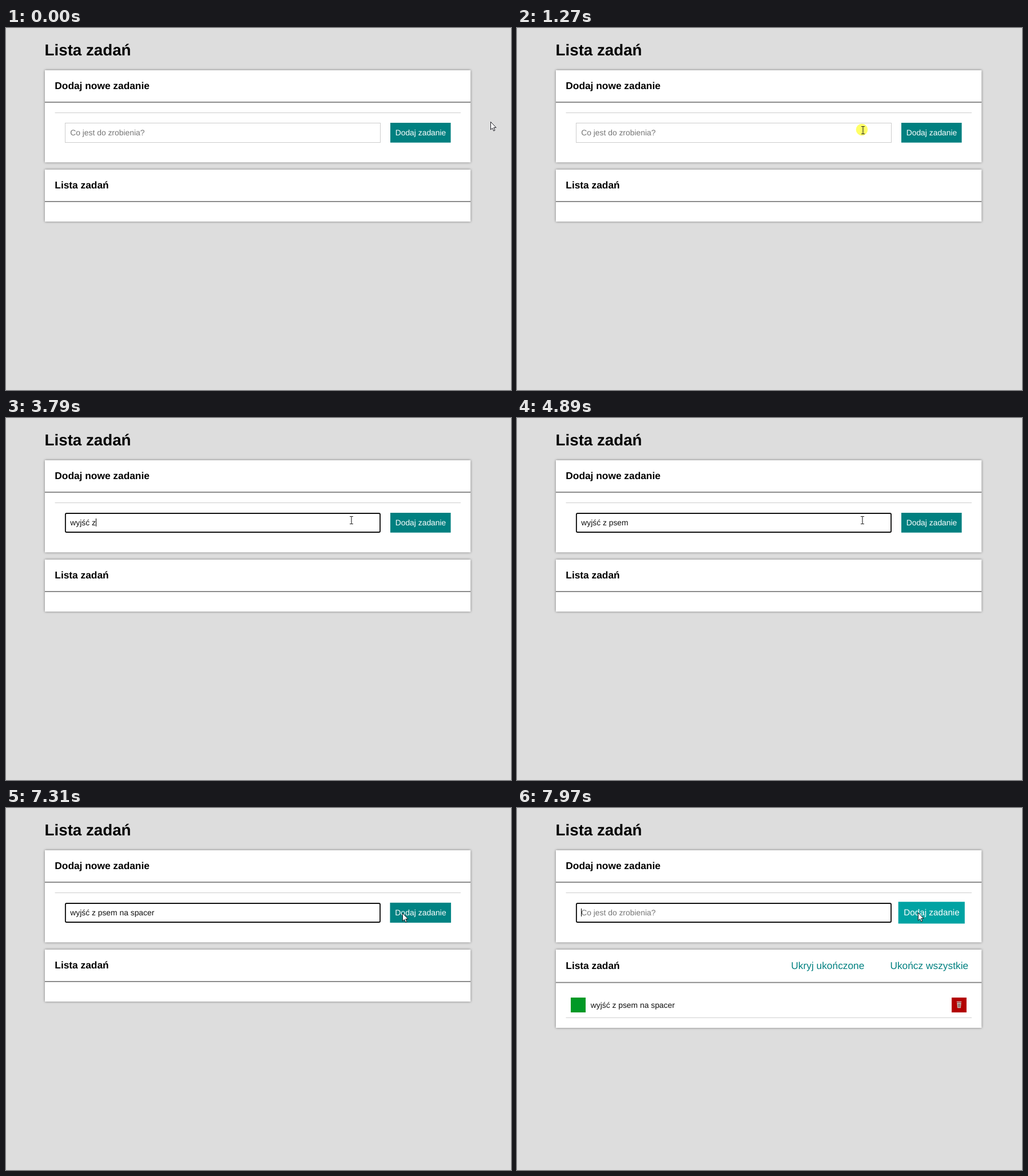
Write an HTML page that moves like this. It is 883x634 px and loops after 7990 ms.

```html
<!DOCTYPE html>
<html lang="pl">
<head>
<meta charset="utf-8">
<title>Lista zadań</title>
<style>
  html, body { margin: 0; width: 100%; height: 100%; overflow: hidden; background: #ddd; }
  svg { display: block; width: 883px; height: 634px; }
  text {
    font: 13.87px "Liberation Sans", Arial, sans-serif;
    text-rendering: geometricPrecision;
    white-space: pre;
  }
  .h1 { font-size: 27.73px; font-weight: bold; }
  .h2 { font-size: 17.33px; font-weight: bold; }
  .link { font-size: 17.33px; fill: teal; }
  .card { fill: #fff; filter: drop-shadow(0 0 2px #0007); }
  .rule { fill: #808080; }
  .thin { fill: #ccc; }
</style>
</head>
<body>
<svg viewBox="0 0 883 634">
  <rect width="883" height="634" fill="#ddd"/>
  <text class="h1" x="67.6" y="48.4">Lista zadań</text>

  <rect class="card" x="68" y="74" width="744.3" height="161.3"/>
  <text class="h2" x="85.3" y="107">Dodaj nowe zadanie</text>
  <rect class="rule" x="68" y="129" width="744.3" height="1.8"/>
  <rect class="thin" x="85.5" y="148" width="709.5" height="1"/>
  <rect id="field" fill="#fff"/>
  <text id="hint" x="112.2" y="188" fill="#757575">Co jest do zrobienia?</text>
  <text id="typed" x="112.2" y="188" fill="#111"></text>
  <rect id="caret" y="176" width="1" height="14"/>
  <g id="button">
    <rect id="face" x="672" y="166" width="105.6" height="34.7"/>
    <text x="725" y="188" fill="#fff" text-anchor="middle">Dodaj zadanie</text>
  </g>

  <rect id="list" class="card" x="68" y="248" width="744.3"/>
  <text id="title" class="h2" x="85.3">Lista zadań</text>
  <rect id="line" class="rule" x="68" width="744.3" height="1.8"/>
  <g id="items">
    <text class="link" x="479.3" y="282">Ukryj ukończone</text>
    <text class="link" x="652.4" y="282">Ukończ wszystkie</text>
    <rect x="94" y="332" width="26" height="26" fill="#009926"/>
    <text x="128.7" y="349.5" fill="#111">wyjść z psem na spacer</text>
    <rect x="760" y="332" width="26" height="26" fill="#b30000"/>
    <path d="M769.3 341h7.4l-.8 9.3h-5.8z" fill="#c9c0b8"/>
    <path d="M769 340.2h8M771.6 342.5v6.5M773 342.5v6.5M774.5 342.5v6.5" stroke="#5c3a35" stroke-width=".7"/>
    <path d="M768.8 339.4h8.4" stroke="#eee" stroke-width="1"/>
    <rect class="thin" x="85.5" y="366.7" width="709.5" height="1"/>
  </g>

  <circle id="spot" r="10.3" fill="#ff0" opacity=".6"/>
  <path id="arrow" d="M.5 .4V14L3.6 11.2 5.7 16.2 7.9 15.2 5.8 10.4H10Z"
        fill="#fff" stroke="#101018" stroke-width=".95"/>
  <path id="beam" d="M-3 -6.5H-.6L0 -6 .6 -6.5H3M0 -6V6M-3 6.5H-.6L0 6 .6 6.5H3"
        fill="none" stroke="#222" stroke-width="1.1"/>
</svg>
<script>
const LOOP = 7990, FOCUS = 1370, HOVER = 7260, ADDED = 7910, BLINK = 518;
const TASK = "wyjść z psem na spacer";
const keys = [2000, 2240, 2520, 3180, 3410, 3520, 3790, 3890, 4040, 4120, 4270,
  4370, 4940, 5390, 5480, 5570, 5790, 5900, 6010, 6130, 6320, 6470];
const clicks = [[1250, 1420], [7790, 7930]];

const linear = u => u;
const easeIn = u => u * u;
const easeOut = u => u * (2 - u);
const smooth = u => u * u * (3 - 2 * u);

// Each stop: time, value, easing of the way there
const pathX = [[20, 847], [550, 762, easeIn], [800, 677, linear], [1230, 605, easeOut],
  [1690, 605], [1691, 604], [6980, 604], [7310, 693, easeIn], [7500, 701, easeOut]];
const pathY = [[800, 163.5], [930, 160, smooth], [1230, 179, smooth],
  [6980, 179], [7310, 184, smooth], [7500, 183, smooth]];

const el = {};
for (const node of document.querySelectorAll("[id]")) el[node.id] = node;

function set(node, attrs) {
  for (const name in attrs) node.setAttribute(name, attrs[name]);
}
function show(node, on) {
  node.style.display = on ? "" : "none";
}
function along(path, t) {
  if (t <= path[0][0]) return path[0][1];
  for (let i = 1; i < path.length; i++) {
    const [t0, a] = path[i - 1], [t1, b, ease = linear] = path[i];
    if (t < t1) return a + (b - a) * ease((t - t0) / (t1 - t0));
  }
  return path[path.length - 1][1];
}

// The CSS "ease" curve
function cssEase(x) {
  if (x <= 0 || x >= 1) return x <= 0 ? 0 : 1;
  const bez = (a, b, s) => 3 * a * s * (1 - s) ** 2 + 3 * b * s * s * (1 - s) + s ** 3;
  let lo = 0, hi = 1;
  for (let i = 0; i < 20; i++) {
    const mid = (lo + hi) / 2;
    if (bez(.25, .25, mid) < x) lo = mid; else hi = mid;
  }
  return bez(.1, 1, lo);
}

function drawField(t) {
  const focused = t >= FOCUS, added = t >= ADDED;
  set(el.field, focused
    ? { x: 103.9, y: 167, width: 550.2, height: 33, rx: 2, stroke: "#101010", "stroke-width": 1.9 }
    : { x: 103.5, y: 166.5, width: 551, height: 34, rx: 0, stroke: "#ccc", "stroke-width": 1 });
  const count = added ? 0 : keys.filter(k => k <= t).length;
  const last = added ? ADDED : count ? keys[count - 1] : FOCUS;
  el.typed.textContent = TASK.slice(0, count);
  show(el.hint, !count);
  show(el.caret, focused && Math.floor((t - last) / BLINK) % 2 === 0);
  const width = count ? el.typed.getComputedTextLength() : 0;
  set(el.caret, { x: Math.round(112.2 + width) });
}

function drawButton(t) {
  const u = cssEase((t - HOVER) / 500), tone = Math.round(128 + 35 * u);
  set(el.face, { fill: `rgb(0,${tone},${tone})` });
  set(el.button, { transform: `translate(725 183.3) scale(${1 + u / 10}) translate(-725 -183.3)` });
}

function drawList(t) {
  const added = t >= ADDED;
  set(el.list, { height: added ? 137 : 91 });
  set(el.title, { y: added ? 282 : 281 });
  set(el.line, { y: added ? 304.7 : 303 });
  show(el.items, added);
}

function drawPointer(t) {
  const x = Math.round(along(pathX, t)), y = Math.round(along(pathY, t));
  const overField = x > 103 && x < 655 && y > 166 && y < 201;
  show(el.arrow, !overField);
  show(el.beam, overField);
  show(el.spot, clicks.some(([from, to]) => t >= from && t < to));
  set(el.arrow, { transform: `translate(${x} ${y})` });
  set(el.beam, { transform: `translate(${x} ${y})` });
  set(el.spot, { cx: x - 2, cy: y - 1 });
}

const start = performance.now();
function frame() {
  const t = (performance.now() - start) % LOOP;
  drawField(t);
  drawButton(t);
  drawList(t);
  drawPointer(t);
  requestAnimationFrame(frame);
}
frame();
</script>
</body>
</html>
```
